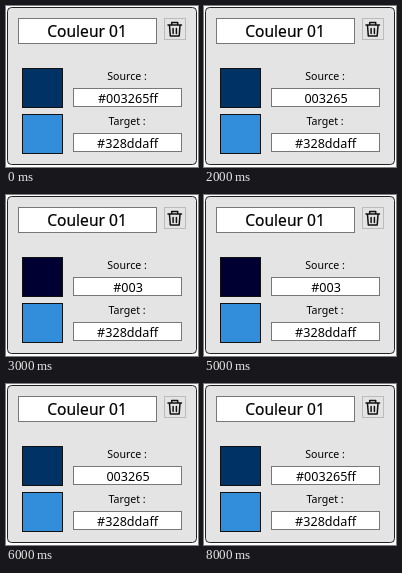
These frames come from a looping animation (192 px wide and 161 px high, 9000 ms). An HTML page:

```html
<!DOCTYPE html>
<html lang="fr">
<head>
<meta charset="utf-8">
<title>Couleur 01</title>
<style>
  html, body { margin: 0; width: 100%; height: 100%; overflow: hidden; background: #fff; }
  svg { display: block; width: 100%; height: 100%; }
  text { font-family: "Noto Sans", "Open Sans", sans-serif; text-anchor: middle; fill: #000; }
  .box { fill: #fff; stroke: #777; }
  .swatch { stroke: #111; }
  .title { font-size: 15.6px; stroke: #000; stroke-width: .2; }
  .label { font-size: 10.6px; }
  .value { font-size: 12.6px; }
  .icon { fill: none; stroke: #111; stroke-width: 1.5; stroke-linecap: round; stroke-linejoin: round; }
</style>
</head>
<body>
<svg viewBox="0 0 192 161">
  <rect x="1.5" y="1.5" width="189" height="157" rx="4" fill="#e4e4e4" stroke="#222"/>

  <rect class="box" x="12.5" y="12.5" width="138" height="25"/>
  <text class="title" x="81" y="31">Couleur 01</text>

  <rect x="158.5" y="12.5" width="21" height="21" fill="#e4e4e4" stroke="#bbb"/>
  <g class="icon">
    <path d="M162 19H175.5M165.7 18.5V16.5H171.7V18.5M163.5 19.5L164.3 30H173.2L174 19.5"/>
    <path d="M167.1 22.5V27.5M170.4 22.5V27.5"/>
  </g>

  <rect id="sourceSwatch" class="swatch" x="16.5" y="62.5" width="40" height="39"/>
  <text class="label" x="121" y="74">Source :</text>
  <rect class="box" x="67.5" y="82.5" width="108" height="18"/>
  <text id="sourceValue" class="value" x="122" y="96.5"></text>

  <rect class="swatch" x="16.5" y="108.5" width="40" height="39" fill="#328dda"/>
  <text class="label" x="121" y="119">Target :</text>
  <rect class="box" x="67.5" y="127.5" width="108" height="18"/>
  <text class="value" x="121.6" y="141.5">#328ddaff</text>
</svg>
<script>
  const STEP = 1000;
  const values = ["#003265ff", "#003265", "003265", "#003", "003"];
  const last = values.length - 1;
  const cycle = 2 * last + 1;
  const swatch = document.getElementById("sourceSwatch");
  const label = document.getElementById("sourceValue");
  const start = performance.now();

  // Steps through the notations and back again.
  function render(time) {
    const step = Math.floor(time / STEP) % cycle;
    const value = values[last - Math.abs(last - step)];
    label.textContent = value;
    swatch.setAttribute("fill", "#" + value.replace("#", ""));
  }

  function tick(now) {
    render(Math.max(0, now - start));
    requestAnimationFrame(tick);
  }

  render(0);
  requestAnimationFrame(tick);
</script>
</body>
</html>
```
